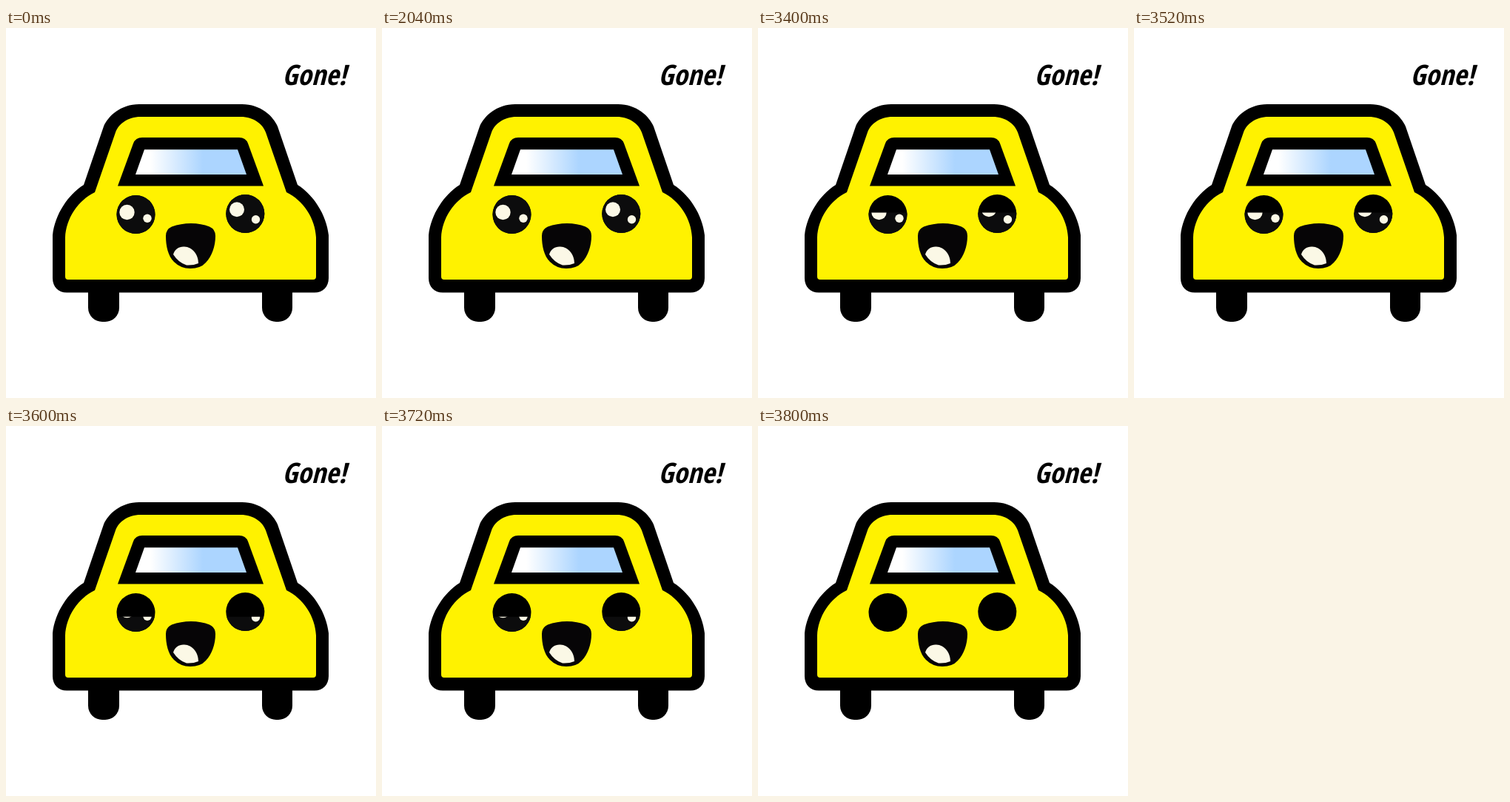
An HTML page that plays this animation: 500x500 px, repeating every 4000 ms.

```html
<!DOCTYPE html>
<html lang="en">
<head>
<meta charset="utf-8">
<title>Blinking car</title>
<style>
  html, body { margin: 0; width: 100%; height: 100%; overflow: hidden; background: #fff; }
  svg { display: block; width: 100vw; height: 100vh; }
  .word {
    font: italic 700 38px "Open Sans Condensed", "Open Sans", "Noto Sans", sans-serif;
    font-stretch: condensed;
    text-anchor: middle;
  }
  .body { fill: #fff200; }
  .eye { fill: #0c0c0d; }
  .shine { fill: #fbf8e6; }
</style>
</head>
<body>
<svg viewBox="0 0 500 500">
  <defs>
    <linearGradient id="glass" gradientUnits="userSpaceOnUse" x1="195" y1="0" x2="266" y2="0">
      <stop offset="0" stop-color="#fff"/>
      <stop offset="1" stop-color="#acd5ff"/>
    </linearGradient>
    <clipPath id="open"><rect id="gap" x="140" y="220" width="220" height="60"/></clipPath>
  </defs>

  <text class="word" x="416.500" y="77">Gone!</text>

  <!-- wheels -->
  <rect x="111" y="335" width="42" height="62" rx="19"/>
  <rect x="346" y="335" width="41" height="62" rx="19"/>

  <!-- outline and paint -->
  <path d="M63 280C66 252 84 225 105 212L132 133C138 119 155 103 180 103H319C344 103 361 119 367 133L394 212C415 225 433 252 436 280V338C436 350 428 357.500 417 357.500H82C71 357.500 63 350 63 338Z"/>
  <path class="body" d="M80 283C81 258 97 233 120 222L148 141C152 130 164 120 182 120H317C335 120 347 130 351 141L379 222C402 233 418 258 419 283V336Q419 340 415 340H84Q80 340 80 336Z"/>

  <!-- rear window -->
  <path d="M151 213.600L172 156Q175 148 184 148H315Q324 148 327 156L348 213.600Z"/>
  <path fill="url(#glass)" d="M187 164.300H313L325 198H175Z"/>

  <!-- closed eyes, then the part the lids leave open -->
  <circle cx="175.500" cy="252" r="26"/>
  <circle cx="323.300" cy="251" r="26"/>
  <g class="shine" clip-path="url(#open)">
    <circle class="eye" cx="175.500" cy="252" r="26"/>
    <circle class="eye" cx="323.300" cy="251" r="26"/>
    <circle cx="163.500" cy="249" r="10.200"/>
    <circle cx="191" cy="257.300" r="5.700"/>
    <circle cx="312" cy="245.300" r="10"/>
    <circle cx="337.500" cy="258.700" r="5.700"/>
  </g>

  <!-- mouth -->
  <path fill="#060506" d="M216 281Q216 272 224 268.500Q236 264 250 264Q264 264 275 268.500Q283 272 283 281C283 295 278 309 270 317Q263 325 249 325Q236 325 227 316C219 308 216 295 216 281Z"/>
  <path class="shine" d="M226 306C228 299 234 295 241 295.500C252 296 260 306 260 318Q253 321 244 320.500Q233 317 226 306Z"/>
</svg>

<script>
  const LOOP = 4000;
  // [start time, lower edge of the eyelids]
  const blink = [[0, 220], [3400, 249.5], [3600, 257.8], [3800, 280]];
  const gap = document.getElementById("gap");
  const start = performance.now();

  function draw(now) {
    const t = Math.max(0, now - start) % LOOP;
    const lid = blink.filter(([at]) => at <= t).pop()[1];
    gap.setAttribute("y", lid);
    gap.setAttribute("height", 280 - lid);
    requestAnimationFrame(draw);
  }
  draw(start);
</script>
</body>
</html>
```
